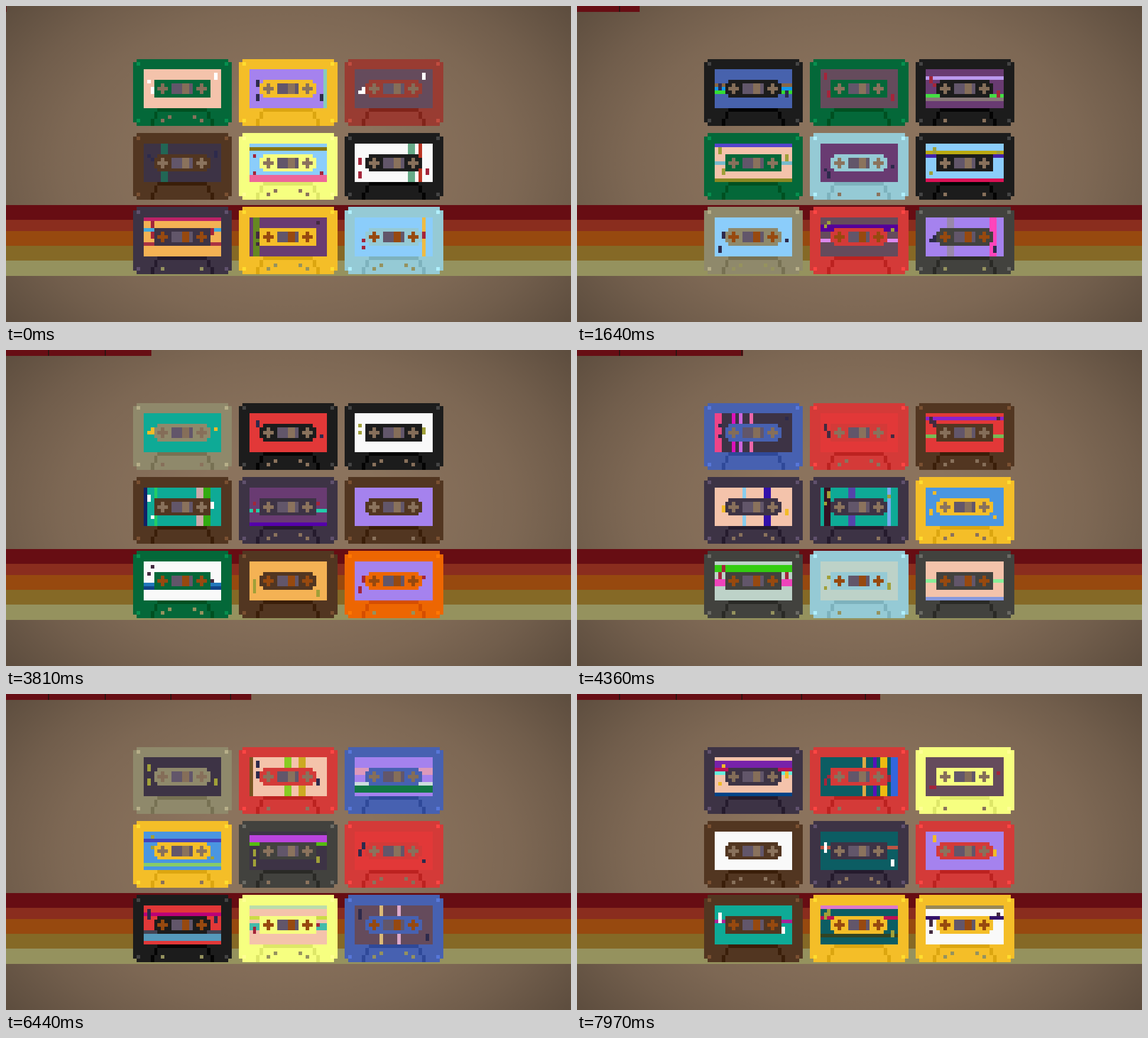
An HTML page with a canvas that plays this animation: 956 by 535 pixels, repeating every 7.99 s.

```html
<!DOCTYPE html>
<html lang="en">
<head>
<meta charset="utf-8">
<title>Cassettes</title>
<style>
html, body { margin: 0; width: 100%; height: 100%; overflow: hidden; }
#stage {
  position: relative; width: 956px; height: 535px; overflow: hidden;
  background:
    linear-gradient(#0000 337px, #670d13 337px 362px, #8a2d1e 362px 381px,
      #97490f 381px 406px, #856926 406px 431px, #95925e 431px 457px, #0000 457px),
    radial-gradient(620px 430px at center,
      #0000 25%, rgba(0,0,0,.06) 48%, rgba(0,0,0,.1) 62%, rgba(0,0,0,.19) 78%, rgba(0,0,0,.34)),
    #8b735d;
}
#stage > * { position: absolute; left: 0; top: 0; }
#bar { height: 10px; overflow: hidden; background: #670e14; }
#bar i { position: absolute; top: 0; width: 2px; height: 10px; margin-left: -1px; background: #2b1512; }
</style>
</head>
<body>
<div id="stage">
  <canvas id="tapes" width="956" height="535"></canvas>
  <div id="bar"></div>
</div>
<script>
const LOOP = 7990;
const BAR_SPEED = 0.0642;              // px per ms
const TICKS = [72, 168, 279, 380, 488]; // the tapes swap as the bar passes each tick
const CELL_W = 5.9643, CELL_H = 5.968;

const SHELLS = {
  green: '#046839', yellow: '#f4be28', rust: '#993c32', brown: '#523621', pale: '#f6ff80',
  black: '#1c1c1c', dusk: '#3d3345', aqua: '#95cad5', khaki: '#8f896b', red: '#d43a38',
  gray: '#42423e', orange: '#ed6602', blue: '#4761b1'
};
const LABELS = {
  peach: '#f4c3ab', violet: '#a582ee', plum: '#654b5c', dusk: '#3d3345', sky: '#8bcdfb',
  white: '#f9f9f9', amber: '#f4b254', purple: '#693b72', blue: '#4762ad', teal: '#0eaa96',
  red: '#e23838', mist: '#bdd2c8', azure: '#4a96e1', sea: '#0c5d63'
};
const INKS = { navy: '#2d2a4c', olive: '#a0a038', wine: '#a4253a', gold: '#f2bb28', ink: '#432a40', white: '#fff' };

// Stripes across and down the label; a look is "shell label splash [square]"
const h = (y, color, n = 1) => [color, 3, y, 22, n];
const v = (x, color, n = 1) => [color, x, 3, n, 11];
const tape = (look, holes, ...stripes) => ({ look: look.split(' '), holes, stripes });

const SETS = [
  [
    tape('green peach white square', 4),
    tape('yellow violet navy', 0, v(24, '#8cb')),
    tape('rust plum white', 0),
    tape('brown dusk navy', 0, v(8, '#265', 2)),
    tape('pale sky wine', 4, h(4, '#871'), h(12, '#e69', 2)),
    tape('black white wine', 0, v(18, '#6a8', 2), v(21, '#b32')),
    tape('dusk amber wine square', 2, h(3, '#b26'), h(6, '#4ad'), h(10, '#a34')),
    tape('yellow purple ink square', 4, v(4, '#682', 2)),
    tape('aqua sky wine', 4, v(22, '#eb4'))
  ],
  [
    tape('black blue navy', 0, h(7, '#864'), h(8, '#19e'), h(9, '#3d3')),
    tape('green plum wine square', 0),
    tape('black purple wine', 2, h(5, '#b9e'), h(10, '#4d4'), h(11, '#877')),
    tape('green peach olive square', 0, h(3, '#54c'), h(8, '#7bc'), h(13, '#882')),
    tape('aqua purple navy', 2),
    tape('black sky olive square', 2, h(5, '#ba1'), h(6, '#42a'), h(13, '#d15')),
    tape('khaki sky navy', 4),
    tape('red plum olive', 0, h(5, '#509', 2), h(9, '#d8e')),
    tape('gray violet navy', 2, v(9, '#98a', 2), v(21, '#f4b', 2))
  ],
  [
    tape('khaki teal gold', 2),
    tape('black red navy', 4),
    tape('black white olive square', 4),
    tape('brown teal white square', 0, v(3, '#126'), v(6, '#2c6'), v(18, '#caa', 2), v(20, '#3a1', 2)),
    tape('dusk purple wine square', 4, h(9, '#2ca'), h(13, '#50a')),
    tape('brown violet none', 2),
    tape('green white ink square', 4, h(9, '#27b'), h(10, '#148')),
    tape('brown amber olive', 0),
    tape('orange violet wine', 2)
  ],
  [
    tape('blue dusk navy', 0, v(3, '#e48', 2), v(8, '#d1b'), v(10, '#c6d'), v(13, '#e6a')),
    tape('red red ink square', 4),
    tape('brown red ink square', 4, h(4, '#82c'), h(9, '#7b5')),
    tape('dusk peach gold', 4, v(11, '#8ce'), v(17, '#31a', 2)),
    tape('dusk teal olive', 2, v(4, '#312', 2), v(11, '#54a', 2), v(22, '#7ae')),
    tape('yellow azure gold', 4),
    tape('gray mist wine square', 2, h(4, '#3c1', 2), h(8, '#e4b', 2)),
    tape('aqua mist olive square', 2),
    tape('gray peach none square', 0, h(8, '#8e9'), h(13, '#89d'))
  ],
  [
    tape('khaki dusk olive', 0),
    tape('red peach navy', 2, v(3, '#752'), v(13, '#8c2', 2), v(17, '#ca2', 2)),
    tape('blue violet none', 0, h(6, '#d9b', 2), h(10, '#cdd'), h(11, '#174', 2)),
    tape('yellow azure olive', 2, h(5, '#44b'), h(12, '#8c6')),
    tape('gray dusk olive square', 2, h(4, '#b4d', 2), h(6, '#5b1')),
    tape('red red navy', 4),
    tape('black red navy', 2, h(5, '#b07'), h(10, '#445'), h(11, '#59b', 2)),
    tape('pale peach wine square', 4, h(3, '#bda'), h(6, '#cd4'), h(8, '#4ba', 2)),
    tape('blue plum navy', 4, v(10, '#db7'), v(15, '#dac'))
  ],
  [
    tape('dusk peach gold', 0, h(4, '#72a', 2), h(6, '#b15'), h(7, '#6ed'), h(13, '#048')),
    tape('red sea wine square', 2, v(15, '#da4'), v(18, '#51b'), v(20, '#eb1', 2), v(23, '#36d', 2)),
    tape('pale plum wine square', 2),
    tape('brown white none', 4),
    tape('dusk sea white square', 4, h(7, '#b54')),
    tape('red violet gold', 0),
    tape('brown teal white square', 0, h(7, '#a29')),
    tape('yellow sea olive', 0, h(3, '#d7c'), h(6, '#b15'), h(11, '#342')),
    tape('yellow white ink', 4, h(3, '#985'), h(6, '#316'))
  ]
];

const ctx = document.getElementById('tapes').getContext('2d');
const bar = document.getElementById('bar');
for (const x of TICKS) bar.appendChild(document.createElement('i')).style.left = x + 'px';

function randomFrom(seed) {
  return () => {
    seed = (seed * 1664525 + 1013904223) >>> 0;
    return seed / 2 ** 32;
  };
}

// Applies a function to each colour channel, given the brightest one
function tint(color, change) {
  const rgb = color.match(/\w\w/g).map(c => parseInt(c, 16));
  const peak = Math.max(...rgb);
  return `rgb(${rgb.map(c => Math.max(0, Math.min(255, Math.round(change(c, peak)))))})`;
}

// Cell rectangle at (x, y), snapped to whole pixels
function snap(x, y, w, n) {
  const left = Math.round(x * CELL_W), top = Math.round(y * CELL_H);
  return [left, top, Math.round((x + w) * CELL_W) - left, Math.round((y + n) * CELL_H) - top];
}

function drawTape({ look: [shell, label, splash, panel], holes, stripes }, x0, y0, random) {
  const body = SHELLS[shell];
  const fill = (color, x, y, w = 1, n = 1) => {
    ctx.fillStyle = color;
    ctx.fillRect(...snap(x0 + x, y0 + y, w, n));
  };
  const cut = (x, y, w = 1, n = 1) => ctx.clearRect(...snap(x0 + x, y0 + y, w, n));

  fill(body, 1, 0, 26, 19);
  fill(body, 0, 1, 28, 17);
  const screw = tint(body, (c, peak) => c * (peak + 40) / peak);
  for (const x of [1, 26]) for (const y of [1, 17]) fill(screw, x, y);

  const shadow = tint(body, c => c - 24);
  fill(shadow, 7, 14, 14);
  for (const step of [0, 1]) {
    fill(shadow, 6 - step, 15 + 2 * step, 1, 2);
    fill(shadow, 21 + step, 15 + 2 * step, 1, 2);
  }

  fill(LABELS[label], 3, 3, 22, 11);
  for (const stripe of stripes) fill(...stripe);

  // Splashes gather at the sides of the label
  for (let i = 0; INKS[splash] && i < 3; i++) {
    const x = (i % 2 ? 22 : 4) + Math.floor(random() * 2);
    const y = 4 + Math.floor(random() * 8);
    const long = random() < 0.5;
    fill(INKS[splash], x, y, 1, long ? 2 : 1);
  }

  const inset = panel === 'square' ? 0 : 1;
  fill(body, 6 + inset, 6, 16 - 2 * inset, 5);
  fill(body, 6, 7, 16, 3);
  fill('#62566a', 11, 7, 6, 3);

  // Openings show the backdrop
  cut(14, 7, 2, 3);
  for (const x of [8, 19]) {
    cut(x, 7, 1, 3);
    cut(x - 1, 8, 3);
    if (holes) cut(x, 17);
  }
  if (holes === 4) for (const x of [10, 17]) cut(x, 16);
}

function drawSet(index) {
  const random = randomFrom(index + 1);
  ctx.clearRect(0, 0, 956, 535);
  SETS[index].forEach((t, i) => drawTape(t, 36 + 30 * (i % 3), 15 + 21 * Math.floor(i / 3), random));
}

let shown = -1;
const start = performance.now();
function frame() {
  const width = 1 + ((performance.now() - start) % LOOP) * BAR_SPEED;
  const current = TICKS.filter(x => x <= width).length;
  if (current !== shown) drawSet(shown = current);
  bar.style.width = Math.round(width) + 'px';
  requestAnimationFrame(frame);
}
frame();
</script>
</body>
</html>
```
